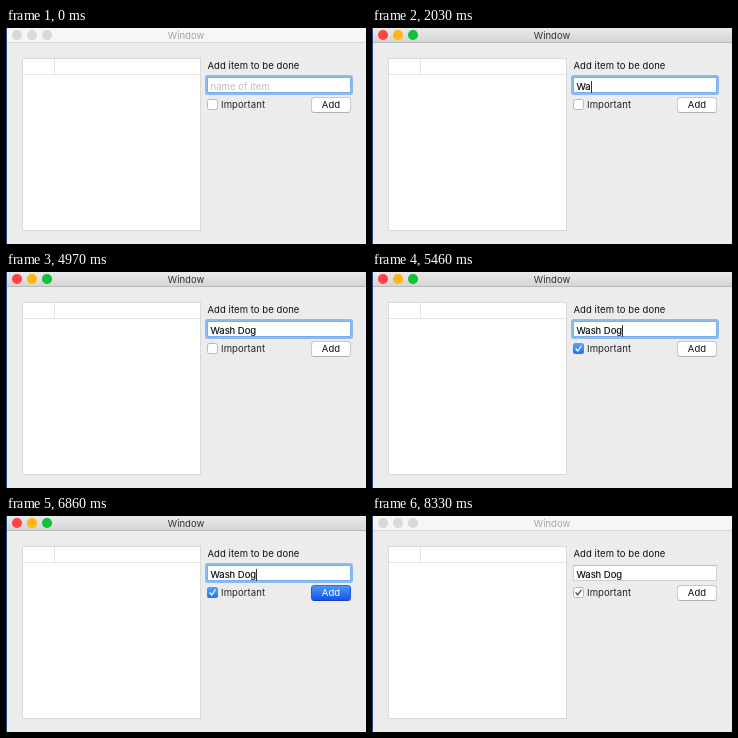
Write an HTML page that moves like this. It is 360 px wide and 216 px high and loops after 8470 ms.

```html
<!DOCTYPE html>
<html lang="en">
<head>
<meta charset="utf-8">
<title>Window</title>
<style>
html, body { margin: 0; width: 100%; height: 100%; overflow: hidden; }
#stage {
  position: relative; width: 360px; height: 216px; overflow: hidden;
  background: #ececec; color: #111;
  font: 9.5px/12px Inter, "Open Sans", sans-serif; letter-spacing: .06px;
}
#stage * { position: absolute; box-sizing: border-box; white-space: pre; }
#edge { left: 0; top: 0; width: 1px; height: 216px; background: #244a85; }
#bar {
  left: 1px; top: 0; width: 359px; height: 15px;
  background: #f6f6f6; border-bottom: 1px solid #d6d6d6; color: #a5a5a5;
}
.active #bar {
  background: linear-gradient(#eaeaea, #d5d5d5);
  border-color: #b8b8b8; color: #333;
}
#bar b { top: 2px; width: 9.5px; height: 9.5px; border-radius: 50%; background: #d9d9d9; }
.active #bar b { background: var(--c); }
#name { left: 0; top: 2px; width: 358px; text-align: center; letter-spacing: 0; }
#table { left: 16px; top: 30px; width: 179px; height: 173px; background: #fff; border: 1px solid #dadada; }
#head { left: 0; top: 0; width: 177px; height: 16px; border-bottom: 1px solid #e4e4e4; }
#split { left: 31px; top: 0; width: 1px; height: 15px; background: #e4e4e4; }
#label { left: 201.5px; top: 32px; }
#field { left: 201px; top: 49px; width: 144px; height: 16px; background: #fff; border: 1px solid #d0d0d0; border-top-color: #bcbcbc; }
.focus #field { border-color: #79aeea; box-shadow: 0 0 0 2px #8abbf2; border-radius: 1px; }
#hint { left: 2.5px; top: 3px; color: #bdbdbd; }
#typed { left: 2.5px; top: 3px; color: #000; letter-spacing: -.04px; -webkit-text-stroke: .12px #000; }
#caret { left: 100%; top: 0; width: 1px; height: 11.5px; background: #333; }
#box { left: 201px; top: 71px; width: 11px; height: 11px; border-radius: 2.5px; background: #fff; border: 1px solid #b8b8b8; }
#shade, #fill { left: -1px; top: -1px; width: 11px; height: 11px; border-radius: 2.5px; }
#shade { background: #777; opacity: 0; }
#fill { background: linear-gradient(#55a5f8, #1c78f3); }
#tick { left: -1px; top: -1px; width: 11px; height: 11px; fill: none; stroke-width: 1.3; stroke-linecap: round; stroke-linejoin: round; }
#option { left: 215px; top: 71px; color: #222; letter-spacing: .1px; }
#add {
  left: 305px; top: 69px; width: 40px; height: 16px; border-radius: 3.5px;
  background: #fff; border: 1px solid #c8c8c8; border-bottom-color: #b0b0b0;
  text-align: center; line-height: 14px;
}
#add.down { background: linear-gradient(#4c98fb, #1553ee); border-color: #2b6ee6 #2358dc #1740bf; color: #fff; }
</style>
</head>
<body>
<div id="stage">
  <div id="bar">
    <b style="left:5px;--c:#ff4449"></b><b style="left:20px;--c:#ffb514"></b><b style="left:35px;--c:#10c13c"></b>
    <div id="name">Window</div>
  </div>
  <div id="edge"></div>
  <div id="table"><div id="head"></div><div id="split"></div></div>
  <div id="label">Add item to be done</div>
  <div id="field">
    <div id="hint">name of item</div>
    <div id="typed"><span id="text" style="position:static"></span><i id="caret"></i></div>
  </div>
  <div id="box">
    <div id="shade"></div><div id="fill"></div>
    <svg id="tick" viewBox="0 0 11 11"><path d="M3 5.8 4.8 8 8.2 3"/></svg>
  </div>
  <div id="option">Important</div>
  <div id="add">Add</div>
</div>
<script>
const LOOP = 8470, STEP = 70;
const $ = id => document.getElementById(id);
const within = (t, spans) => spans.some(([from, to]) => t >= from && t < to);
const ramp = (t, from, to) => Math.min(1, Math.max(0, (t - from) / (to - from)));

const keys = [1750, 2030, 2240, 2450, 2590, 2940, 3150, 3430];
const caretOn = [[840, 1400], [1750, 4970], [5250, 5810], [6440, 7000], [7560, 8190]];
const presses = [[6230, 6440], [6860, 7000]];

function draw(time) {
  const t = time % LOOP;
  const step = Math.floor(t / STEP) * STEP;
  const active = t >= 840 && t < 8330;
  const text = "Wash Dog".slice(0, keys.filter(k => t >= k).length);
  const checked = ramp(step, 5180, 5460);

  $("stage").className = (active ? "active " : "") + (t < 8330 ? "focus" : "");
  $("text").textContent = text;
  $("hint").style.display = text ? "none" : "";
  $("caret").style.display = within(t, caretOn) ? "" : "none";
  $("shade").style.opacity = 0.25 * ramp(step, 4970, 5180) * (1 - checked);
  $("fill").style.opacity = active ? checked : 0;
  $("tick").style.opacity = checked;
  $("tick").style.stroke = active ? "#fff" : "#444";
  $("add").className = within(t, presses) ? "down" : "";
}

const start = performance.now();
function tick() {
  draw(performance.now() - start);
  requestAnimationFrame(tick);
}
tick();
</script>
</body>
</html>
```
